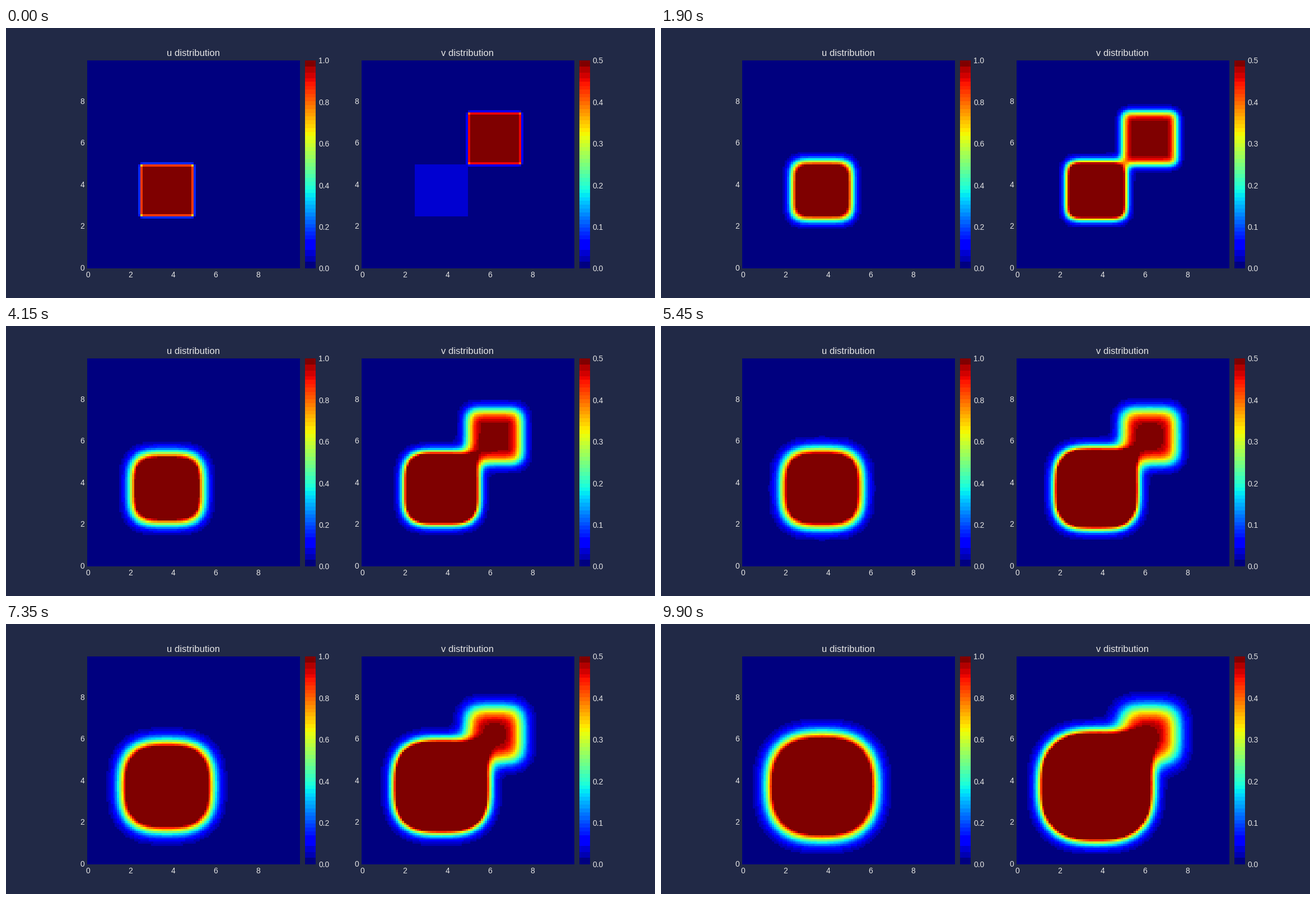
A matplotlib script for the animation above (9950 ms loop, 1159 by 483 pixels).

```python
import numpy as np
import matplotlib.pyplot as plt
from matplotlib.animation import FuncAnimation
from matplotlib.colors import ListedColormap

plt.rcParams.update({
    "font.family": "Liberation Sans",
    "font.size": 10,
    "axes.titlesize": 12,
    "text.color": "0.9",
    "xtick.color": "0.9",
    "ytick.color": "0.9",
})

WIDTH, HEIGHT, DPI = 1159, 483, 100
FRAMES, INTERVAL = 199, 50
CELLS, DX = 100, 0.1

# Rates per time step, in units of grid cells
DIFF_U, DIFF_V = 0.1, 0.05
GROWTH, CAPACITY = 0.022, 3.0
RELEASE = 0.021


def banded_jet(size=512):
    """Jet reduced to flat colour bands, wider at both ends."""
    edges = np.concatenate([[0, 0.034, 0.058, 0.087],
                            np.linspace(0.14, 0.914, 43),
                            [0.942, 0.97, 1]])
    centres = (edges[:-1] + edges[1:]) / 2
    centres[0], centres[-1] = 0, 1
    position = (np.arange(size) + 0.5) / size
    band = np.digitize(position, edges) - 1
    return ListedColormap(plt.get_cmap("jet")(centres[band]))


def laplacian(field):
    return sum(np.roll(field, shift, axis)
               for shift in (-1, 1) for axis in (0, 1)) - 4 * field


def step(u, v):
    du = DIFF_U * laplacian(u) + GROWTH * u * (1 - u / CAPACITY)
    dv = DIFF_V * laplacian(v) + RELEASE * u
    return u + du, v + dv


def simulate():
    u, v = np.zeros((2, CELLS, CELLS))
    u[25:50, 25:50] = 1.0
    v[50:75, 50:75] = 0.5
    u, v = step(u, v)
    states = []
    for _ in range(FRAMES):
        u, v = step(u, v)
        states.append((u, v))
    return states


def add_panel(left, title, vmax, cmap):
    """Heat map with a slim colour bar; left edge in pixels."""
    slot, gap = 0.775 * WIDTH / 2.2, 10
    width = (slot - gap) / 1.05
    bottom, height = 0.11, 0.77
    ax = fig.add_axes([left / WIDTH, bottom, width / WIDTH, height])
    cax = fig.add_axes([(left + width + gap) / WIDTH, bottom,
                        0.05 * width / WIDTH, height])
    low, high = -DX / 2, (CELLS - 0.5) * DX
    image = ax.imshow(np.zeros((CELLS, CELLS)), cmap=cmap, vmin=0, vmax=vmax,
                      origin="lower", extent=(low, high, low, high),
                      aspect="auto", interpolation="nearest")
    ax.set_title(title)
    ax.set_xticks(range(0, 10, 2))
    ax.set_yticks(range(0, 10, 2))
    ax.spines[:].set_visible(False)
    bar = fig.colorbar(image, cax=cax, ticks=np.linspace(0, vmax, 6))
    bar.outline.set_visible(False)
    for axes in (ax, cax):
        axes.tick_params(length=0, pad=3.5)
    return image


fig = plt.figure(figsize=(WIDTH / DPI, HEIGHT / DPI), dpi=DPI,
                 facecolor="#212946")
cmap = banded_jet()
left_u = 0.125 * WIDTH
left_v = left_u + 1.2 * 0.775 * WIDTH / 2.2
images = [add_panel(left_u, "u distribution", 1.0, cmap),
          add_panel(left_v, "v distribution", 0.5, cmap)]
states = simulate()


def update(frame):
    for image, field in zip(images, states[frame]):
        image.set_data(field)
    return images


anim = FuncAnimation(fig, update, frames=FRAMES, interval=INTERVAL,
                     repeat=True, repeat_delay=0, blit=False)
plt.show()
```
